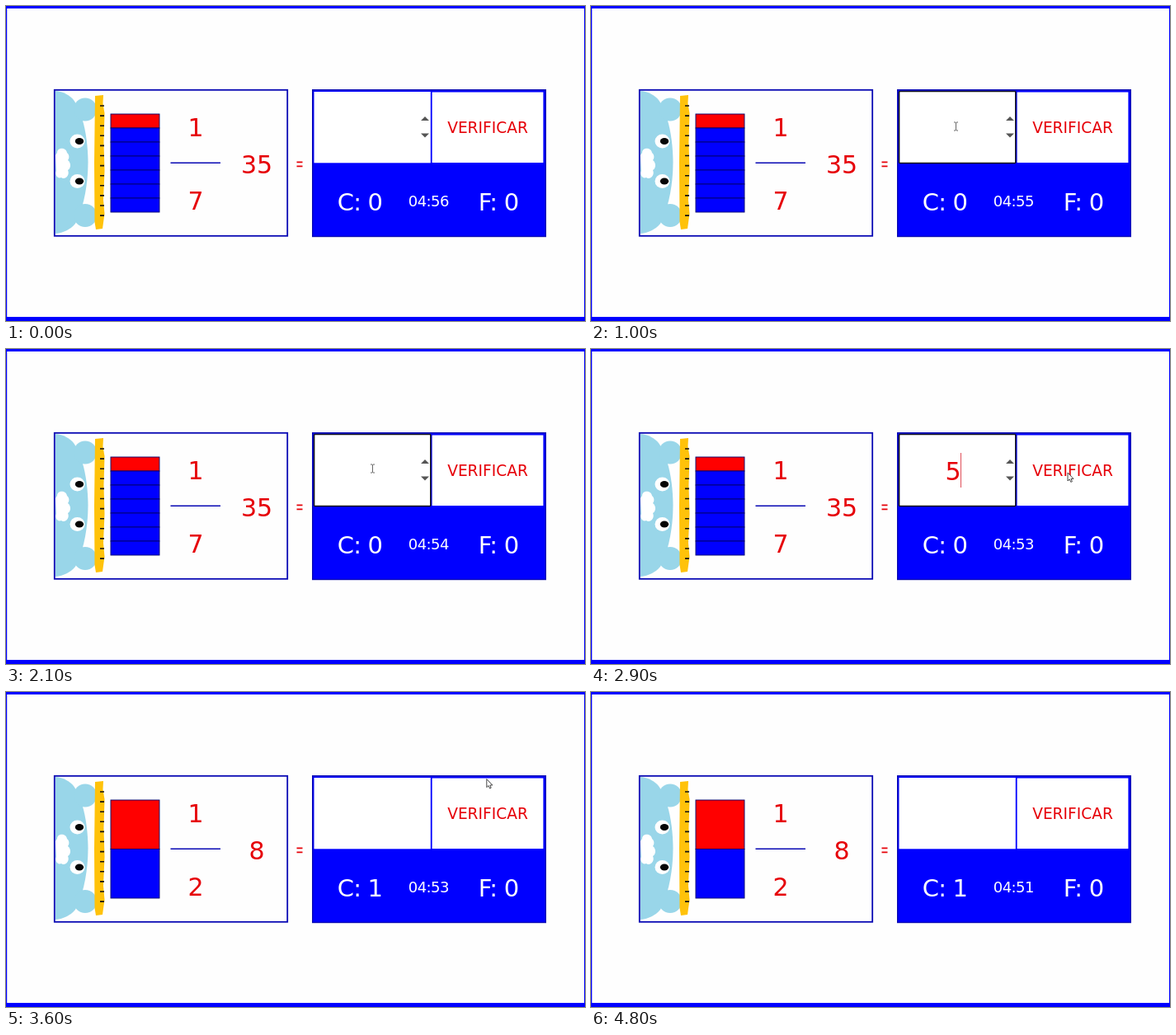
Recreate the animation shown at these times as an HTML page. Size 702 px wide and 382 px high, loop 5300 ms.

```html
<!DOCTYPE html>
<html lang="es">
<head>
<meta charset="utf-8">
<title>Fracciones</title>
<style>
  html, body { margin: 0; width: 100%; height: 100%; overflow: hidden; background: #fefefe; }
  svg { display: block; width: 100vw; height: 100vh; }
  text { font: 30px "DejaVu Sans", sans-serif; text-anchor: middle; }
  .red { fill: #e60008; }
  .score { fill: #fff; font-size: 29px; letter-spacing: -.8px; }
  #timer { fill: #fff; font-size: 18px; letter-spacing: -.6px; }
  #check { font-size: 18.6px; }
  .rule { fill: none; stroke: #0808b4; }
</style>
</head>
<body>
<svg viewBox="0 0 702 382">
  <path fill="#00f" d="M0 0H702V382H0ZM1.2 3V377H701V3Z" fill-rule="evenodd"/>

  <!-- question -->
  <rect class="rule" x="58.8" y="101.8" width="282.4" height="177" stroke-width="1.8"/>
  <g fill="#99d6e9">
    <path d="M60 103C70 104 77 108 82 114C91 127 99 152 99.5 189C99.5 222 92 250 84 264C78 271 70 275 60 276Z"/>
    <circle cx="96" cy="125.5" r="14"/>
    <circle cx="96" cy="254" r="14"/>
  </g>
  <path fill="#fff" d="M62 178C62 171 73 171 74 178C77 180 77 185 75 187C80 191 78 198 75 199C78 206 71 211 67 208C62 210 59 204 61 200L60 181Z"/>
  <g id="eyes"></g>
  <path fill="#ffc20a" d="M108 109L118 108L117.5 118L119.5 130L118.5 165L119.5 200L118 235L119.5 252L117 270L109 271L107.5 262L107 190Z"/>
  <path id="ticks" stroke="#111" stroke-width="1.6"/>
  <g id="bars"></g>
  <text class="red" x="230" y="158">1</text>
  <path class="rule" d="M199.5 190.3H260" stroke-width="1.4"/>
  <text class="red" id="den" x="230" y="247"></text>
  <text class="red" id="whole" x="304" y="202.5"></text>
  <path stroke="#e60008" stroke-width="1.6" d="M352.5 189.4H359.5M352.5 194.4H359.5"/>

  <!-- answer -->
  <rect x="371" y="101" width="284" height="179" fill="#00f"/>
  <rect class="rule" x="371.7" y="101.7" width="282.6" height="177.8" stroke-width="1.4"/>
  <rect x="373.5" y="104" width="141.3" height="86.3" fill="#fff"/>
  <rect x="516.6" y="104.5" width="134.8" height="85.5" fill="#fff"/>
  <rect id="focus" x="373.6" y="103.6" width="141.2" height="87" rx="1" fill="#fff" stroke="#101018" stroke-width="1.5"/>
  <path id="spin" fill="#555" d="M503 139L508 134L513 139ZM503 154.5H513L508 159.5Z"/>
  <text class="red" id="answer" x="439" y="159"></text>
  <path id="caret" stroke="#e0505a" d="M0 126V168"/>
  <text class="red" id="check" x="584" y="154">VERIFICAR</text>
  <text class="score" id="right" x="429" y="248"></text>
  <text id="timer" x="512.3" y="243"></text>
  <text class="score" x="597" y="248">F: 0</text>

  <path id="beam" fill="none" stroke="#666" d="M-2.5 -5H-.5L0 -4.5L.5 -5H2.5M0 -4.5V4.5M-2.5 5H-.5L0 4.5L.5 5H2.5"/>
  <path id="arrow" fill="#fff" stroke="#333" stroke-width=".9" d="M0 0V10L2.2 8L3.8 11.4L5.4 10.6L4 7.4H7Z"/>
</svg>
<script>
const LOOP = 5300, STEP = 100;
const $ = id => document.getElementById(id);
const show = (id, on) => $(id).setAttribute('visibility', on ? 'visible' : 'hidden');
const move = (id, x, y) => $(id).setAttribute('transform', `translate(${x} ${y})`);

// Pointer path: time, x, y
const path = [
  [400, 452, 150], [700, 442, 146], [1200, 442, 146], [1400, 444, 145],
  [2500, 444, 145], [2800, 578, 150], [3400, 578, 150], [3900, 590, 39], [4000, 592, 9]
];

function pointer(t) {
  const i = Math.max(1, path.findIndex(p => p[0] >= t));
  const [t0, x0, y0] = path[i - 1], [t1, x1, y1] = path[i];
  const k = (t - t0) / (t1 - t0);
  return [x0 + (x1 - x0) * k, y0 + (y1 - y0) * k];
}

function drawBars(n) {
  const h = 119 / n;
  $('bars').innerHTML = Array.from({ length: n }, (_, i) =>
    `<rect x="127" y="${131 + i * h}" width="59" height="${h}" fill="${i ? '#00f' : '#f00'}" stroke="#00006e" stroke-width=".9"/>`
  ).join('');
}

$('eyes').innerHTML = [164, 212.5].map(y =>
  `<ellipse cx="86.5" cy="${y}" rx="9" ry="8.5" fill="#fff"/><ellipse cx="89" cy="${y}" rx="5.2" ry="4" fill="#050505"/>`
).join('');
$('ticks').setAttribute('d', Array.from({ length: 12 }, (_, i) => `M114 ${121 + i * 12.1}H119`).join(''));

let last = -1;
function render(t) {
  if (t === last) return;
  last = t;
  const solved = t >= 3500, typed = t >= 2500;
  const focused = t >= 500 && t < 3000;

  drawBars(solved ? 2 : 7);
  $('den').textContent = solved ? 2 : 7;
  $('whole').textContent = solved ? 8 : 35;
  $('right').textContent = solved ? 'C: 1' : 'C: 0';
  $('answer').textContent = typed && !solved ? 5 : '';
  $('timer').textContent = '04:' + (56 - Math.floor((t + 200) / 1000));

  show('focus', focused);
  show('spin', t < 3000);
  show('caret', focused && (t - 500) % 1000 < 500);
  move('caret', typed ? 448.5 : 439.5, 0);

  const visible = t >= 400 && t <= 4000;
  const [x, y] = visible ? pointer(t) : [0, 0];
  const overInput = x < 500;
  show('beam', visible && overInput);
  show('arrow', visible && !overInput);
  move('beam', x + .5, y);
  move('arrow', x, y);
}

const start = performance.now();
function frame() {
  const t = (performance.now() - start) % LOOP;
  render(Math.floor(t / STEP) * STEP);
  requestAnimationFrame(frame);
}
render(0);
frame();
</script>
</body>
</html>
```
